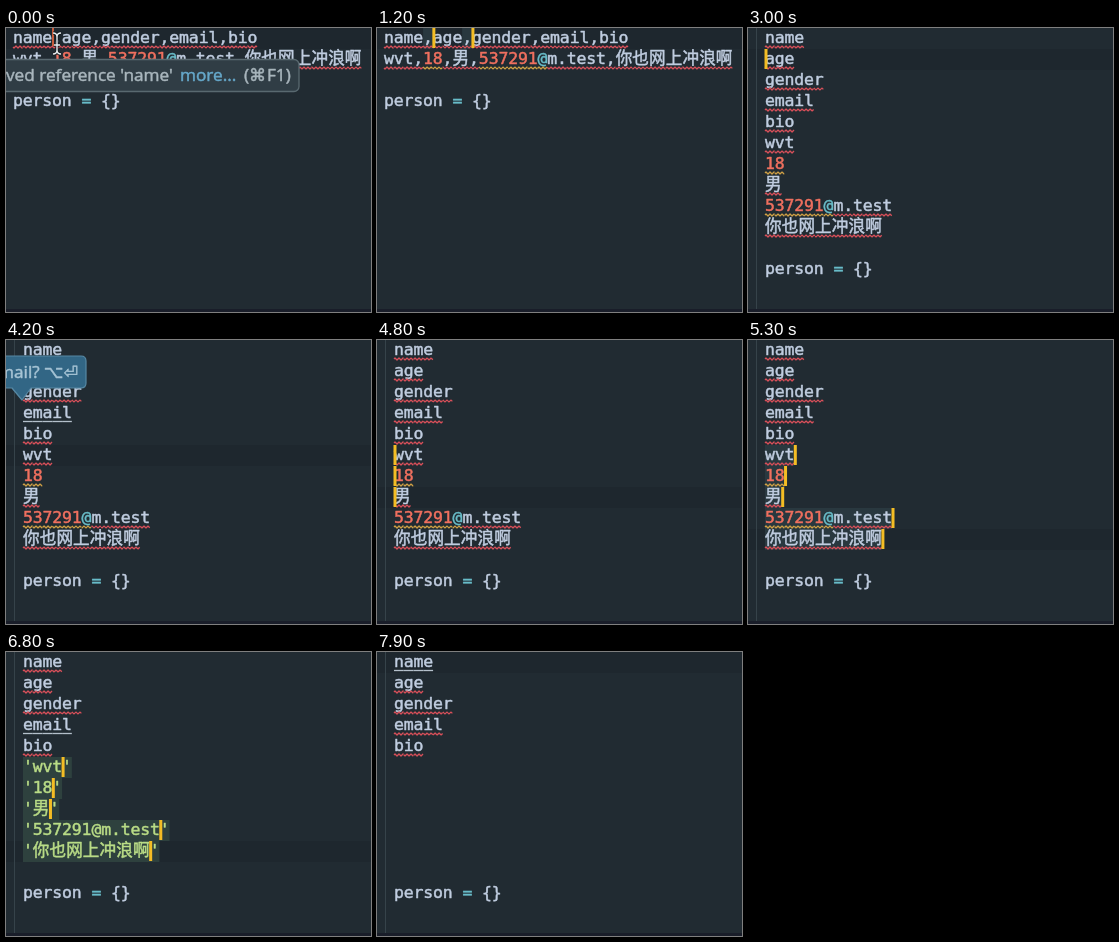
An HTML page with a canvas for the animation above (8000 ms loop, 365 by 284 pixels).

```html
<!DOCTYPE html>
<html lang="en">
<head>
<meta charset="utf-8">
<title>Multi-caret editing</title>
<style>
  html, body { margin: 0; width: 100%; height: 100%; overflow: hidden; background: #212b32; }
  canvas { display: block; }
</style>
</head>
<body>
<canvas id="stage" width="365" height="284"></canvas>
<script>
const ctx = document.getElementById('stage').getContext('2d');
const WIDTH = 365, HEIGHT = 284, LOOP = 8000;
const ROW = 21, CELL = 9.77, WIDE = 16.7;
const MONO = '16.5px "DejaVu Sans Mono", monospace';
const CJK = '16.6px "Noto Sans CJK SC", "Noto Sans CJK", sans-serif';
const UI = '17.2px "Open Sans", "Noto Sans", "DejaVu Sans", sans-serif';
const SYMBOL = '17px "DejaVu Sans", sans-serif';
const COLOR = {
  back: '#212b32', line: '#1e272e', strip: '#191d29', gutter: '#36434a',
  text: '#c0cde0', number: '#f0705f', operator: '#69bdc9', string: '#b9dc86',
  caret: '#f4bd24', select: '#29383f', quoted: '#2e413e',
  error: '#d9505a', warning: '#cfa045', plain: '#b4c0cb',
  tip: '#a9b6bd', link: '#66a8ca', hint: '#a7c4d5'
};

const header = ['name', 'age', 'gender', 'email', 'bio'];
const values = ['wvt', '18', '男', '537291@m.test', '你也网上冲浪啊'];
const csv = [header.join(','), values.join(',')];
const commas = csv.flatMap((text, row) =>
  [...text].flatMap((ch, col) => ch === ',' ? [{ row, col }] : []));

const SELECT_AT = [700, 1100, 1300, 1400, 1500, 1700, 1800, 1900];
const SPLIT = 2300, COLLAPSE = 2800, STEPS_DOWN = [3300, 3600, 3900, 4100];
const ADD_CARETS = 4600, SELECT_LINES = 5100, QUOTE = 5700, CUT = 7200, STEP_UP = 7400;

const countPast = (times, t) => times.filter(at => t >= at).length;
const charWidth = ch => ch > '\u2fff' ? WIDE : CELL;
const textWidth = text => [...text].reduce((sum, ch) => sum + charWidth(ch), 0);

function box(x, y, w, h, color) {
  ctx.fillStyle = color;
  ctx.fillRect(x, y, w, h);
}

// A thin outline gives the glyphs a medium weight.
function label(text, x, y, color, font) {
  ctx.font = font;
  ctx.fillStyle = ctx.strokeStyle = color;
  ctx.lineWidth = 0.5;
  ctx.lineJoin = 'round';
  ctx.fillText(text, x, y);
  ctx.strokeText(text, x, y);
}

function charColor(ch, quoted) {
  if (quoted) return COLOR.string;
  if (/\d/.test(ch)) return COLOR.number;
  return /[@=]/.test(ch) ? COLOR.operator : COLOR.text;
}

function underline(x, row, width, color, straight) {
  const y = row * ROW + 19;
  ctx.beginPath();
  ctx.moveTo(x, straight ? y - 0.5 : y + Math.abs((x + 400) % 4 - 2) - 1);
  if (straight) ctx.lineTo(x + width, y - 0.5);
  else for (let px = x; px <= x + width; px += 0.5) {
    ctx.lineTo(px, y + Math.abs((px + 400) % 4 - 2) - 1);
  }
  ctx.strokeStyle = color;
  ctx.lineWidth = 1.3;
  ctx.stroke();
}

// mark: 'wave', 'straight' or 'none'
function code(text, x, row, mark = 'wave') {
  const quoted = text[0] === "'";
  for (const ch of text) {
    const width = charWidth(ch);
    label(ch, x, row * ROW + 15, charColor(ch, quoted), width === WIDE ? CJK : MONO);
    if (mark === 'straight') underline(x, row, width, COLOR.plain, true);
    if (mark === 'wave') underline(x, row, width, /[\d@]/.test(ch) ? COLOR.warning : COLOR.error);
    x += width;
  }
}

const caret = (x, row, color = COLOR.caret) => box(x - 0.5, row * ROW, 3, 20, color);
const lineHighlight = row => box(0, row * ROW, WIDTH, ROW, COLOR.line);

function tooltip() {
  ctx.beginPath();
  ctx.roundRect(-12, 31.5, 305, 32, 5);
  ctx.fillStyle = '#303d45';
  ctx.fill();
  ctx.strokeStyle = '#596970';
  ctx.lineWidth = 1.3;
  ctx.stroke();
  label("ved reference 'name'", 0, 53, COLOR.tip, UI);
  label('more...', 174, 53, COLOR.link, UI);
  label('(', 238, 53, COLOR.tip, UI);
  label('⌘', 243, 53, COLOR.tip, SYMBOL);
  label('F1)', 261, 53, COLOR.tip, UI);
}

function importHint() {
  ctx.beginPath();
  ctx.moveTo(-10, 16);
  ctx.lineTo(75, 16);
  ctx.quadraticCurveTo(80, 16, 80, 21);
  ctx.lineTo(80, 43);
  ctx.quadraticCurveTo(80, 48, 75, 48);
  ctx.lineTo(25, 48);
  ctx.lineTo(16, 60);
  ctx.lineTo(6, 48);
  ctx.lineTo(-10, 48);
  ctx.closePath();
  ctx.fillStyle = '#326685';
  ctx.fill();
  ctx.strokeStyle = '#5688a4';
  ctx.lineWidth = 1.2;
  ctx.stroke();
  label('mail?', -8, 38, COLOR.hint, UI);
  label('⌥⏎', 38, 38, COLOR.hint, SYMBOL);
}

function pointer() {
  ctx.beginPath();
  ctx.moveTo(47, 5);
  ctx.quadraticCurveTo(51, 5, 51, 9);
  ctx.quadraticCurveTo(51, 5, 55, 5);
  ctx.moveTo(51, 8);
  ctx.lineTo(51, 23);
  ctx.moveTo(47, 26);
  ctx.quadraticCurveTo(51, 26, 51, 22);
  ctx.quadraticCurveTo(51, 26, 55, 26);
  ctx.moveTo(48, 17);
  ctx.lineTo(54, 17);
  ctx.strokeStyle = '#10171b';
  ctx.lineWidth = 3;
  ctx.stroke();
  ctx.strokeStyle = '#e8edf0';
  ctx.lineWidth = 1.4;
  ctx.stroke();
}

function drawCsv(t) {
  const left = 7;
  const chosen = commas.slice(0, countPast(SELECT_AT, t));
  const commaX = ({ row, col }) => left + textWidth([...csv[row]].slice(0, col).join(''));
  lineHighlight(0);
  chosen.forEach(c => box(commaX(c), c.row * ROW, CELL, ROW, COLOR.select));
  csv.forEach((text, row) => code(text, left, row));
  code('person = {}', left, 3, 'none');
  if (chosen.length) chosen.forEach(c => caret(commaX(c) + CELL, c.row));
  else box(46, 0, 2, 18, '#c65a3a');
  if (t < 400) tooltip();
  if (t < 900) pointer();
}

function drawList(t) {
  const left = 17;
  const quoted = t >= QUOTE && t < CUT;
  const body = t >= CUT ? [] : quoted ? values.map(v => `'${v}'`) : values;
  const rows = [...header, ...body];
  let active = 9, carets = [];

  if (t < COLLAPSE) {
    carets = [1, 2, 3, 4, 6, 7, 8, 9].map(row => [left, row]);
  } else if (t < ADD_CARETS) {
    active = 1 + countPast(STEPS_DOWN, t);
    if (active < 5) carets = [[left, active]];
  } else if (t < SELECT_LINES) {
    active = 5 + Math.min(4, Math.floor((t - ADD_CARETS) / 100));
    for (let row = 5; row <= active; row++) carets.push([left, row]);
  } else if (t < CUT) {
    carets = values.map((v, i) => [left + textWidth(v) + (quoted ? CELL : 0), i + 5]);
  } else if (t < STEP_UP) {
    carets = values.map((v, i) => [left, i + 5]);
  } else {
    active = Math.max(0, 5 - Math.floor((t - STEP_UP) / 100));
    if (active > 0) carets = [[left, active]];
  }

  lineHighlight(active);
  box(8, 0, 1, 281, COLOR.gutter);
  if (t >= SELECT_LINES) body.forEach((text, i) =>
    box(left, (i + 5) * ROW, textWidth(text), ROW, quoted ? COLOR.quoted : COLOR.select));

  const emailPlain = (t >= 3900 && t < ADD_CARETS) || quoted;
  rows.forEach((text, row) => {
    const straight = (row === 3 && emailPlain) || (row === 0 && t >= 7800);
    code(text, left, row, text[0] === "'" ? 'none' : straight ? 'straight' : 'wave');
  });
  code('person = {}', left, 11, 'none');
  carets.forEach(([x, row]) => caret(x, row));
  if (t >= 3900 && t < 4500) importHint();
}

function draw(t) {
  box(0, 0, WIDTH, HEIGHT, COLOR.back);
  if (t < SPLIT) drawCsv(t);
  else drawList(t);
  box(0, 281, WIDTH, 3, COLOR.strip);
}

const start = performance.now();
function tick() {
  draw((performance.now() - start) % LOOP);
  requestAnimationFrame(tick);
}
tick();
</script>
</body>
</html>
```
